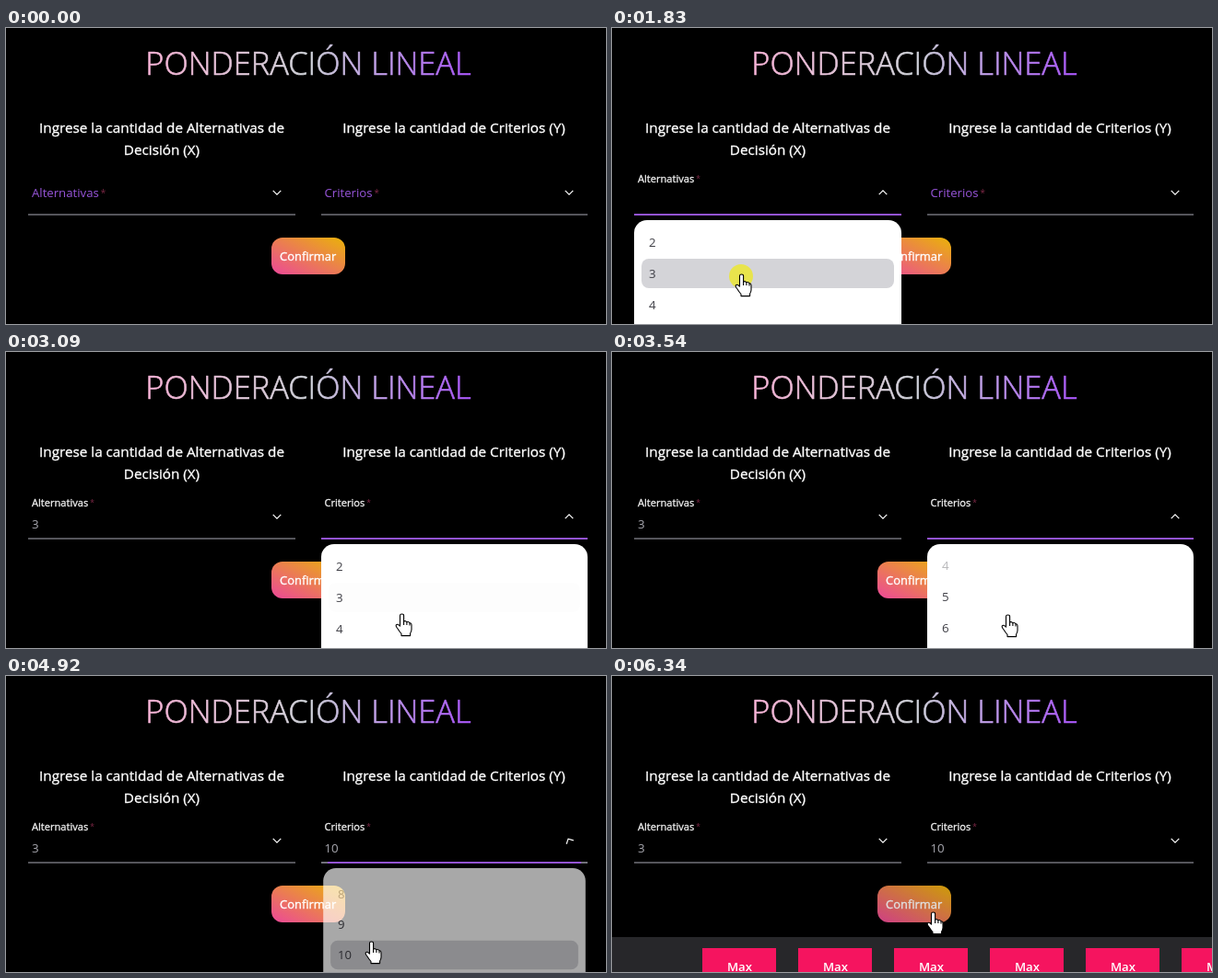
An HTML page that plays this animation: 651x322 px, repeating every 7.01 s.

```html
<!DOCTYPE html>
<html lang="es">
<head>
<meta charset="utf-8">
<title>Ponderación lineal</title>
<style>
  html, body { margin: 0; width: 100%; height: 100%; overflow: hidden; background: #000; }
  svg { display: block; width: 651px; height: 322px; font-family: "Open Sans", "Noto Sans", sans-serif; }
</style>
</head>
<body>
<svg id="stage" viewBox="0 0 651 322">
  <defs>
    <linearGradient id="titleFill" gradientUnits="userSpaceOnUse" x1="152" y1="0" x2="504" y2="0">
      <stop offset="0" stop-color="#f9b4d8"/>
      <stop offset=".5" stop-color="#d1d5db"/>
      <stop offset="1" stop-color="#a855f7"/>
    </linearGradient>
    <linearGradient id="buttonFill" gradientUnits="userSpaceOnUse" x1="312" y1="280" x2="344" y2="216">
      <stop offset="0" stop-color="#ec4899"/>
      <stop offset="1" stop-color="#eab308"/>
    </linearGradient>
    <clipPath id="buttonClip"><rect x="288" y="228" width="80" height="40" rx="12"/></clipPath>
    <clipPath id="listClip"><rect y="217" width="290" height="256"/></clipPath>
  </defs>
  <rect width="651" height="322"/>
  <text x="328" y="51.3" font-size="34.4" font-weight="300" text-anchor="middle" fill="url(#titleFill)" stroke="url(#titleFill)" stroke-width=".6">PONDERACIÓN LINEAL</text>
  <g font-size="15.25" text-anchor="middle" fill="#fff" stroke="#fff" stroke-width=".35">
    <text x="169" y="114">Ingrese la cantidad de Alternativas de</text>
    <text x="169" y="138">Decisión (X)</text>
    <text x="486" y="114">Ingrese la cantidad de Criterios (Y)</text>
  </g>
  <g id="fields"></g>
  <g id="button">
    <rect x="288" y="228" width="80" height="40" rx="12" fill="url(#buttonFill)"/>
    <circle id="ripple" cx="349" cy="259" fill="#fff" clip-path="url(#buttonClip)"/>
    <text x="327.7" y="253" font-size="12.9" text-anchor="middle" fill="#fff" stroke="#fff" stroke-width=".35">Confirmar</text>
  </g>
  <g id="table"><rect y="284" width="651" height="38" fill="#27272a"/></g>
  <g id="popovers"></g>
  <circle id="halo" r="13" fill="#e8e44c"/>
  <g id="cursor" fill="#fff" stroke="#000" stroke-width="1.1" stroke-linejoin="round">
    <path id="arrow" d="M0 0V16.8L4 13.1L6.7 19.2L9.3 18.1L6.7 12H12Z"/>
    <g id="hand">
      <path d="M-2.5 1.8Q-2.5 0-.5 0Q1.6 0 1.6 1.8V8Q3.5 6.8 4.9 8.8Q7 7.8 8 9.8Q10 9.6 10 12V17Q9.8 19.5 8.6 21V23.6H-1V21.5Q-3.2 19-5 16Q-7.6 13-6.5 11.6Q-5 10.4-2.5 13.2Z"/>
      <path d="M1.6 8V12M4.9 8.8V12M8 9.8V12.5" fill="none"/>
    </g>
  </g>
</svg>
<script>
const LOOP = 7010;
const byId = id => document.getElementById(id);

function add(parent, tag, attrs = {}, text) {
  const el = document.createElementNS('http://www.w3.org/2000/svg', tag);
  set(el, attrs);
  if (text !== undefined) el.textContent = text;
  parent.appendChild(el);
  return el;
}
function set(el, attrs) {
  for (const key in attrs) el.setAttribute(key, attrs[key]);
}
const show = (el, on) => el.setAttribute('visibility', on ? 'visible' : 'hidden');
const clamp = x => Math.max(0, Math.min(1, x));
const ramp = (t, start, length) => clamp((t - start) / length);
const mix = (a, b, k) => a + (b - a) * k;
const easeInOut = x => x < .5 ? 2 * x * x : 1 - 2 * (1 - x) ** 2;
const easeOut = x => 1 - (1 - x) ** 3;
const mixColor = (a, b, k) => `rgb(${a.map((v, i) => Math.round(mix(v, b[i], k)))})`;
const within = (t, a, b) => t >= a && t < b;

const PURPLE = [147, 83, 211], WHITE = [245, 245, 245];
const ITEM_STEP = 34;

// hover entries: [from, until, item index]
const selects = [
  { x: 24, textX: 28, width: 290, label: 'Alternativas', value: '3',
    open: 800, close: 1960, blur: 2280, over: [[400, 2050]],
    hover: [[1290, 1400, 0], [1400, 9999, 1]] },
  { x: 342, textX: 345.5, width: 289, label: 'Criterios', value: '10',
    open: 2720, close: 4880, blur: 4890, over: [[2370, 4960]],
    hover: [[2860, 2930, 0], [2930, 3015, 1], [3110, 3400, 2], [3940, 9999, 8]] },
];

function buildSelect(s) {
  const g = add(byId('fields'), 'g');
  s.labelEl = add(g, 'text', { x: s.textX });
  add(s.labelEl, 'tspan', {}, s.label);
  add(s.labelEl, 'tspan', { dx: 2, dy: -1, 'font-size': '75%', fill: '#7c2745', stroke: 'none' }, '*');
  s.valueEl = add(g, 'text', { x: s.textX, y: 192, 'font-size': 13.3, fill: '#a8a8b0' }, s.value);
  s.chevron = add(g, 'path', { d: 'M-4.3-2.1L0 2.1L4.3-2.1', fill: 'none', stroke: '#fff', 'stroke-width': 1.2 });
  s.base = add(g, 'rect', { x: s.x, y: 202, width: s.width, height: 2 });
  s.focus = add(g, 'rect', { y: 202, height: 2, fill: '#9353d3' });

  s.popover = add(byId('popovers'), 'g');
  add(s.popover, 'rect', { y: 209, width: s.width, height: 272, rx: 14, fill: '#fff' });
  const list = add(s.popover, 'g', { 'clip-path': 'url(#listClip)' });
  s.items = Array.from({ length: 13 }, (_, i) => {
    const el = add(list, 'g');
    const back = add(el, 'rect', { x: 8, y: -16, width: s.width - 16, height: 32, rx: 8, fill: '#d4d4d8' });
    add(el, 'text', { x: 16, y: 5, 'font-size': 13.3, fill: '#3f3f46' }, i + 2);
    return { el, back };
  });
}
selects.forEach(buildSelect);

for (let i = 0; i < 6; i++) {
  const x = 98 + 104 * i;
  add(byId('table'), 'rect', { x, y: 296, width: 80, height: 40, fill: '#f5145f' });
  add(byId('table'), 'text', { x: x + 40.5, y: 321, 'font-size': 13.2, 'font-weight': 600, 'text-anchor': 'middle', fill: '#fff' }, 'Max');
}

// cursor waypoints: time, x, y
const path = [
  [30, 530, 335], [500, 243, 186], [900, 243, 186], [1420, 146, 263], [1450, 146, 263],
  [1540, 141, 268], [1990, 141, 268], [2310, 407, 212], [2500, 446, 184], [2780, 446, 184],
  [3090, 430, 285], [3330, 430, 286], [3980, 430, 286], [4140, 428, 292],
  [4340, 428, 292], [4710, 397, 289], [4960, 397, 289], [5400, 349, 257],
];
const clicks = [[730, 850], [1830, 1960], [2650, 2770], [4850, 4890], [5680, 5800]];
const arrowTimes = [[0, 420], [2080, 2390], [5000, 5290]];

function cursorAt(t) {
  const i = path.findIndex(p => p[0] > t);
  if (i === 0) return path[0].slice(1);
  if (i < 0) return path[path.length - 1].slice(1);
  const [a, b] = [path[i - 1], path[i]];
  const k = easeInOut((t - a[0]) / (b[0] - a[0]));
  return [mix(a[1], b[1], k), mix(a[2], b[2], k)];
}

// two wheel turns of 100 px
const scrollAt = t => 100 * easeInOut(ramp(t, 3360, 300)) + 100 * easeInOut(ramp(t, 3660, 320));

function drawSelect(s, t) {
  const lift = easeOut(ramp(t, s.open, 200));
  const labelColor = mixColor(PURPLE, WHITE, lift);
  set(s.labelEl, {
    y: mix(184, 167.5, lift),
    'font-size': mix(13.2, 11.1, lift),
    fill: labelColor,
    stroke: labelColor,
    'stroke-width': mix(.05, .3, lift),
  });
  show(s.valueEl, t >= s.close);

  const turn = 180 * (easeInOut(ramp(t, s.open, 150)) - easeInOut(ramp(t, s.close, 150)));
  set(s.chevron, { transform: `translate(${s.x + s.width - 20} 179) rotate(${turn})` });

  const grown = s.width * (easeInOut(ramp(t, s.open, 200)) - easeInOut(ramp(t, s.blur, 200)));
  set(s.focus, { x: s.x + (s.width - grown) / 2, width: grown });
  const hovered = s.over.some(([a, b]) => within(t, a, b));
  set(s.base, { fill: hovered ? '#71717a' : '#55555b' });

  const shut = ramp(t, s.close, 120);
  const opacity = ramp(t, s.open, 150) - shut;
  const scale = mix(.95, 1, easeOut(ramp(t, s.open, 150))) - .045 * shut;
  show(s.popover, opacity > 0);
  if (opacity <= 0) return;
  const half = s.width / 2;
  set(s.popover, {
    opacity,
    transform: `translate(${s.x + half} 209) scale(${scale}) translate(${-half} -209)`,
  });
  const scroll = s === selects[1] ? scrollAt(t) : 0;
  s.items.forEach(({ el, back }, i) => {
    const y = 233 + ITEM_STEP * i - scroll;
    set(el, {
      transform: `translate(0 ${y})`,
      opacity: mix(1, clamp((y - 217) / 42), clamp(scroll / 20)),
    });
    const glow = s.hover
      .filter(h => h[2] === i)
      .reduce((sum, [a, b]) => sum + ramp(t, a, 80) - ramp(t, b, 80), 0);
    set(back, { opacity: clamp(glow) });
  });
}

function drawButton(t) {
  const press = ramp(t, 5680, 80) - ramp(t, 5800, 120);
  const scale = 1 - .03 * press;
  set(byId('button'), {
    opacity: 1 - .12 * ramp(t, 5290, 110),
    transform: `translate(328 248) scale(${scale}) translate(-328 -248)`,
  });
  const wave = ramp(t, 5700, 620);
  set(byId('ripple'), { r: 80 * easeOut(wave), opacity: t < 5700 ? 0 : .3 * (1 - wave) });
}

function drawCursor(t) {
  const [x, y] = cursorAt(t);
  const isArrow = arrowTimes.some(([a, b]) => within(t, a, b));
  set(byId('cursor'), { transform: `translate(${x} ${y})` });
  show(byId('arrow'), isArrow);
  show(byId('hand'), !isArrow);
  set(byId('halo'), { cx: x - 1, cy: y + 2 });
  show(byId('halo'), clicks.some(([a, b]) => within(t, a, b)));
}

function draw(t) {
  selects.forEach(s => drawSelect(s, t));
  drawButton(t);
  show(byId('table'), t >= 5820);
  drawCursor(t);
}

const start = performance.now();
function tick() {
  draw((performance.now() - start) % LOOP);
  requestAnimationFrame(tick);
}
tick();
</script>
</body>
</html>
```
